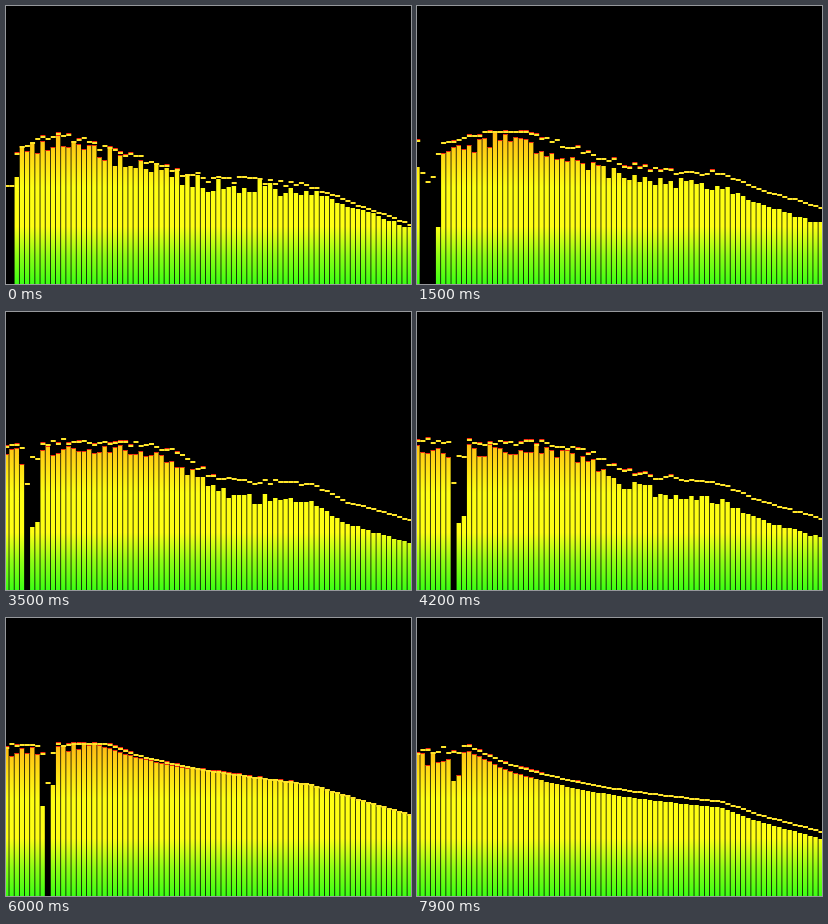
Animation of 405x278 px, one loop 8 s. Source, as an HTML page:

```html
<!DOCTYPE html>
<html lang="en">
<head>
<meta charset="utf-8">
<title>Spectrum analyzer</title>
<style>
html, body { margin: 0; width: 100%; height: 100%; overflow: hidden; background: #000; }
svg { display: block; width: 100vw; height: 100vh; }
</style>
</head>
<body>
<svg viewBox="0 0 405 278" preserveAspectRatio="none">
  <defs>
    <linearGradient id="level" gradientUnits="userSpaceOnUse" x1="0" y1="122" x2="0" y2="278">
      <stop offset="0" stop-color="#ffb414"/>
      <stop offset=".18" stop-color="#ffd814"/>
      <stop offset=".38" stop-color="#ffff14"/>
      <stop offset=".63" stop-color="#ffff14"/>
      <stop offset=".82" stop-color="#8cff14"/>
      <stop offset="1" stop-color="#3cff14"/>
    </linearGradient>
  </defs>
  <rect width="405" height="278"/>
  <path id="bars" fill="url(#level)"/>
  <path id="hot" fill="#f22a10"/>
  <path id="caps" fill="#ffe62a"/>
</svg>
<script>
const LOOP = 8000, STEP = 100, FLOOR = 278, CEILING = 123;
const BARS = 79, PITCH = 5.17, FIRST = -1.77, WIDTH = 4.4;

// Each scene: top = bar tops at TOP_X, gap = peak marker heights above them at GAP_X,
// notch = [centre bar, half width, depth, trailing bars], noise, and where the noise ends.
const TOP_X = [10, 50, 90, 130, 170, 210, 250, 305, 340, 405];
const GAP_X = [60, 130, 250, 405];
const scenes = [
  { at: 0, noise: 9, edge: 405, notch: [.3, 1.3, 200, 0], gap: [6, 8, 8, 4],
    top: [146, 134, 145, 158, 172, 181, 181, 186, 199, 222] },
  { at: 1500, noise: 7, edge: 405, notch: [2.3, 1.6, 200, 0], gap: [11, 13, 13, 17],
    top: [143, 143, 128, 145, 160, 171, 177, 181, 197, 218] },
  { at: 3500, noise: 6, edge: 405, notch: [4, .6, 200, 2.5], gap: [9, 7, 18, 25],
    top: [141, 138, 138, 137, 149, 181, 187, 191, 211, 232] },
  { at: 4900, noise: 6, edge: 405, notch: [10, .6, 200, 3.5], gap: [8, 9, 17, 16],
    top: [133, 138, 139, 139, 149, 165, 178, 188, 202, 221] },
  { at: 6000, noise: 6, edge: 82, notch: [7.95, .8, 200, 0], gap: [6, 3, 0, 0],
    top: [132, 133, 126, 139, 148, 154, 159, 166, 177, 196] },
  { at: 7000, noise: 6, edge: 48, notch: [4, .6, 48, 0], gap: [8, 12, 2, 2],
    top: [144, 124, 147, 159, 167, 173, 178, 184, 197, 214] },
  { at: 7900, noise: 8, edge: 44, notch: [7.2, 1.2, 22, 0], gap: [6, 8, 7, 8],
    top: [140, 132, 152, 164, 173, 179, 184, 190, 203, 221] }
];

const mix = (a, b, k) => a + (b - a) * k;
const mixAll = (a, b, k) => a.map((v, i) => mix(v, b[i], k));

function along(xs, ys, x) {
  let i = 1;
  while (i < xs.length - 1 && x > xs[i]) i++;
  const k = Math.max(0, Math.min(1, (x - xs[i - 1]) / (xs[i] - xs[i - 1])));
  return mix(ys[i - 1], ys[i], k);
}

function random(a, b) {
  const v = Math.sin(a * 127.1 + b * 311.7 + 4.3) * 43758.5453;
  return (v - Math.floor(v)) * 2 - 1;
}

function sceneAt(t) {
  let i = 1;
  while (i < scenes.length - 1 && t > scenes[i].at) i++;
  const a = scenes[i - 1], b = scenes[i];
  const k = Math.min(1, (t - a.at) / (b.at - a.at));
  return {
    noise: mix(a.noise, b.noise, k),
    edge: mix(a.edge, b.edge, k),
    notch: mixAll(a.notch, b.notch, k),
    gap: mixAll(a.gap, b.gap, k),
    top: mixAll(a.top, b.top, k)
  };
}

function notchDrop([centre, width, depth, tail], bar) {
  const d = bar - centre;
  const drop = depth / (1 + (d / width) ** 6);
  return d > .5 && d < tail ? Math.max(drop, 72) : drop;
}

const box = (x, y, w, h) => `M${x.toFixed(2)} ${y}h${w}v${h}h${-w}z`;

function draw(t) {
  const step = Math.floor(t / STEP), scene = sceneAt(step * STEP);
  let bars = "", hot = "", caps = "";
  for (let i = 0; i < BARS; i++) {
    const x = FIRST + i * PITCH, mid = x + WIDTH / 2;
    const base = along(TOP_X, scene.top, mid);
    const drop = notchDrop(scene.notch, i);
    const noise = mid > scene.edge ? 0 : scene.noise * along([250, 330], [1, .2], mid);
    const top = Math.round(Math.min(FLOOR, Math.max(CEILING + 1, base + drop + noise * random(i, step))));
    const peak = base - along(GAP_X, scene.gap, mid) + drop * .2
      + noise * .45 * random(i + 200, Math.floor(step / 3));
    const cap = Math.round(Math.max(CEILING + 2, Math.min(top, peak)));

    if (top < FLOOR) bars += box(x, top, WIDTH, FLOOR - top);
    if (top < 160) hot += box(x, top, WIDTH, 1);
    caps += box(x, cap, 5, 2);
    if (cap < 165 && random(i, 900) > 0) hot += box(x, cap - 1, 5, 1);
  }
  document.getElementById("bars").setAttribute("d", bars);
  document.getElementById("hot").setAttribute("d", hot);
  document.getElementById("caps").setAttribute("d", caps);
}

const start = performance.now();
function tick() {
  draw((performance.now() - start) % LOOP);
  requestAnimationFrame(tick);
}
tick();
</script>
</body>
</html>
```
